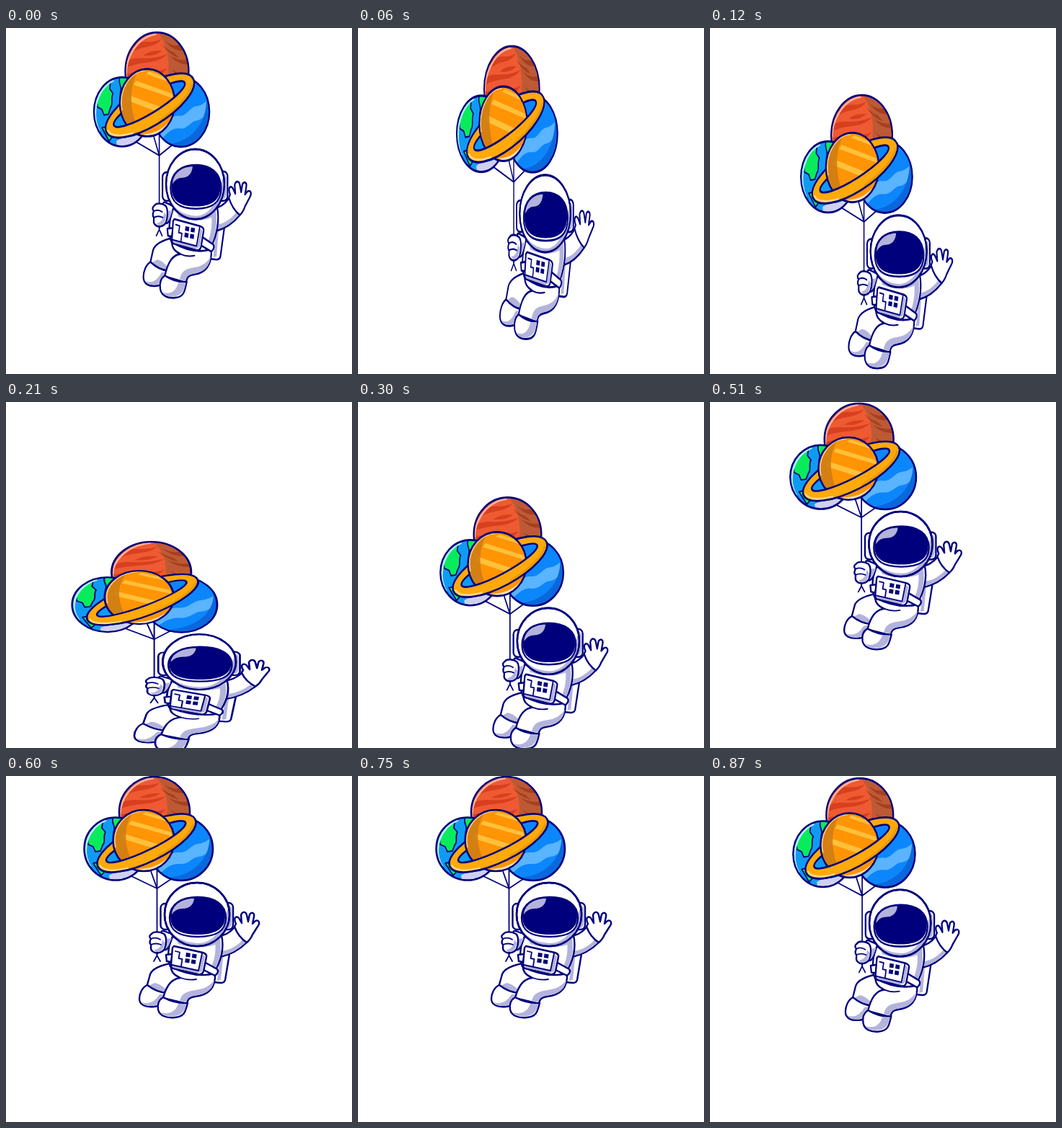
An HTML page for the animation above (0.9 s loop, 480 by 480 pixels).

```html
<!DOCTYPE html>
<html lang="en">
<head>
<meta charset="utf-8">
<title>Balloon astronaut</title>
<style>
  html, body { margin: 0; width: 100%; height: 100%; overflow: hidden; background: #fff; }
  svg { display: block; width: 100vw; height: 100vh; }
  .ink { fill: none; stroke: #00007c; stroke-width: 2.5; stroke-linecap: round; stroke-linejoin: round; }
  .suit { fill: #fff; stroke: #00007c; stroke-width: 2.4; stroke-linecap: round; stroke-linejoin: round; }
  .shade { fill: #b3b3dc; }
  .thin { stroke-width: 1.8; }
  .navy { fill: #00007c; }
</style>
</head>
<body>
<svg viewBox="0 0 480 480">
  <defs>
    <clipPath id="mars"><circle cx="206" cy="50" r="49"/></clipPath>
    <clipPath id="earth"><circle cx="152" cy="101" r="43.5"/></clipPath>
    <clipPath id="neptune"><circle cx="243" cy="101" r="44"/></clipPath>
    <clipPath id="saturn"><circle cx="191" cy="89.500" r="42.500"/></clipPath>
    <clipPath id="head"><ellipse cx="265" cy="192" rx="45" ry="44"/></clipPath>
    <clipPath id="front"><rect x="-90" y="-2" width="180" height="52"/></clipPath>
    <g id="ring">
      <path fill="#ffa90a" fill-rule="evenodd" d="M-75 0A75 26 0 0 1 75 0A75 26 0 0 1-75 0ZM-61-2A61 12 0 0 0 61-2A61 12 0 0 0-61-2Z"/>
      <path fill="none" stroke="#ffd98a" stroke-width="2.500" d="M-72-1C-72 10-52 17-38 20"/>
      <path fill="none" stroke="#e89a08" stroke-width="3" d="M5 23.500C40 22 62 14 71 4"/>
      <ellipse class="ink" rx="75" ry="26"/>
      <ellipse class="ink" cy="-2" rx="61" ry="12"/>
    </g>
  </defs>

  <g id="flyer">
    <g clip-path="url(#mars)">
      <rect x="150" width="112" height="105" fill="#ee5a31"/>
      <path fill="#d83f1f" d="M170 18C184 8 194 17 213 9C204 21 186 17 170 25ZM158 38C176 28 187 39 222 28C205 43 183 35 157 46ZM158 54C180 47 193 55 222 46L212 55C190 60 180 52 159 61ZM185 30Q196 23 214 24Q202 32 185 30Z"/>
      <path fill="#bd5a35" d="M207 0Q232 27 220 72L262 100V0Z"/>
      <path fill="#a6401f" d="M219 11Q229 19 241 17L247 24Q230 25 219 11ZM226 30Q240 38 256 35V41Q238 43 226 30ZM228 47Q243 56 254 52V58Q240 60 228 47ZM214 16Q224 24 232 26L240 33Q224 29 214 16Z"/>
      <path fill="none" stroke="#ffb59c" stroke-width="2.500" d="M160 67C152 36 174 7 205 3"/>
    </g>
    <circle class="ink" cx="206" cy="50" r="49"/>

    <g clip-path="url(#earth)">
      <rect x="106" y="55" width="92" height="92" fill="#109bf2"/>
      <g class="ink thin" style="fill:#08ec5c">
        <path d="M118 75C123 68 128 65 134 65L133 72L138 78C134 84 139 91 134 96L131 104L124 105L121 98L114 95Q112 84 118 75Z"/>
        <path d="M149 57C145 65 152 68 150 75C147 82 154 84 154 91L166 84V57Z"/>
        <path d="M121 121L131 119L139 130L132 138Z"/>
      </g>
      <path fill="#d0d0f0" d="M143 138C156 129 168 138 187 124L179 147H145Z"/>
      <path fill="none" stroke="#b5ecff" stroke-width="3" d="M117 126C104 105 111 73 139 61"/>
    </g>
    <circle class="ink" cx="152" cy="101" r="43.500"/>

    <g clip-path="url(#neptune)">
      <rect x="198" y="56" width="92" height="92" fill="#0c86fb"/>
      <path fill="#5ab4ff" d="M210 125C221 112 229 105 240 106C253 107 256 95 267 94C276 93 280 89 289 83V101C280 102 278 111 267 112C257 113 254 123 241 122C230 121 222 127 214 135Z"/>
      <path fill="#0a68dc" d="M282 78C286 112 262 137 228 141L240 148H290V78Z"/>
    </g>
    <circle class="ink" cx="243" cy="101" r="44"/>

    <path class="ink thin" d="M174 139L209.500 156L229 143M201 132L209.500 156"/>
    <path class="ink" style="stroke-width:1.800" d="M209.500 130V248"/>

    <use href="#ring" transform="translate(195 93) rotate(-26)"/>
    <g clip-path="url(#saturn)">
      <rect x="147" y="45" width="90" height="90" fill="#ff9405"/>
      <path fill="#ffc03a" d="M174 62L229 78L231 84L170 67ZM163 80L225 99L220 105L158 86ZM194 50L217 57L223 63L189 53Z"/>
      <path fill="#cf7d14" fill-opacity=".88" d="M181 45C160 66 162 105 184 134H145V45Z"/>
      <path fill="#ffe2b8" d="M183 129Q207 129 224 114L226 127L200 137Z"/>
      <path fill="none" stroke="#ffc77a" stroke-width="2" d="M152 99C146 74 164 50 188 49"/>
    </g>
    <circle class="ink" cx="191" cy="89.500" r="42.500"/>
    <g transform="translate(195 93) rotate(-26)"><use href="#ring" clip-path="url(#front)"/></g>

    <!-- backpack -->
    <path class="suit" d="M296 238L307 239Q312 241 310 247L304 283Q303 287 298 287L288 286Z"/>
    <path class="shade" d="M302 242L298 283L293 284L297 246Z"/>

    <!-- waving arm -->
    <path class="suit" d="M294 222C304 222 311 217 318 209L334 231C323 242 311 248 297 251Z"/>
    <path class="shade" d="M299 249C311 247 321 241 332 231L329 227C317 239 307 242 298 243Z"/>
    <path class="suit" d="M317 209L319 205C315 197 319 193 323 197L327 204L326 193C328 187 333 188 334 193L336 202L338 192C341 188 345 190 344 195L342 205L346 201C351 199 353 204 349 209L342 220Q339 227 334 231Q322 223 317 209Z"/>

    <!-- far leg -->
    <path class="suit" d="M233 259C216 262 203 267 200 275L195 293L220 305L245 282Z"/>
    <path class="shade" d="M198 291L206 287Q214 288 222 296L218 304Z"/>
    <path class="suit" d="M196 290C189 293 185 302 185 309C185 318 194 321 205 320C216 320 216 311 223 301Q209 300 196 290Z"/>
    <path class="shade" d="M188 314Q203 319 213 303L220 303Q214 320 200 319Q191 319 188 314Z"/>

    <!-- torso and near leg -->
    <path class="suit" d="M230 222C225 238 222 254 229 266C239 279 269 280 288 274C299 256 303 239 299 221Q267 244 230 222Z"/>
    <path class="shade" d="M297 225C300 242 296 260 287 273L279 275C289 260 292 244 290 231Z"/>
    <path class="shade" d="M237 229Q265 243 292 229L290 234Q266 242 239 233Z"/>
    <path class="suit" d="M229 265C229 272 233 276 242 280C230 281 222 292 218 308L251 316C252 309 255 307 262 306C281 304 291 294 290 274Q262 281 229 265Z"/>
    <path class="shade" d="M289 283C287 297 278 303 260 305Q251 307 250 314L241 312C244 301 250 299 263 297Q281 295 289 283Z"/>
    <path class="ink thin" d="M242 280Q253 284 264 282"/>
    <path class="suit" d="M218 307C211 311 210 318 211 324C213 333 223 336 234 335C249 334 249 325 252 315Q234 316 218 307Z"/>
    <path class="shade" d="M214 328Q233 333 239 316L250 316Q248 331 234 333Q220 335 214 328Z"/>

    <!-- belt and control box -->
    <path class="suit" d="M222 248L231 247L229 258L223 257ZM275 258L293 268Q296 272 290 277L272 268Z"/>
    <path class="suit" d="M233 236L273 245Q279 247 278 251L274 271Q272 276 267 275L232 267Q229 266 229 262L231 238Z"/>
    <path class="shade" d="M272 247L276 250L272 271L267 273Z"/>
    <path class="shade" d="M231 262L267 270V274L232 266Z"/>
    <path class="ink thin" d="M272 246L267 270L230 262M235 243L241 244.500L239.500 253L244.500 254L243 264"/>
    <path class="navy" d="M250 245l6 1-.8 5.500-6-1ZM258.700 246.500l6 1-.8 5.500-6-1ZM249 253l6 1-.8 5.500-6-1ZM257.500 254.500l6 1-.8 5.500-6-1Z"/>

    <!-- arm on the string -->
    <path class="suit" d="M232 220L219 215Q214 214 216 219L219 241Q223 243 227 234Z"/>
    <path class="shade" d="M230 225L221 226L221 239Q225 238 227 232Z"/>
    <path class="suit" d="M202 219C205 215 214 216 219 219C224 223 222 235 220 240C216 246 207 247 203 243C199 240 202 237 201 234C198 231 200 228 201 226C198 223 199 221 202 219Z"/>
    <path class="shade" d="M205 241Q215 241 217 227L220 231Q219 245 208 244Z"/>
    <path class="ink thin" d="M201 226Q208 223 214 227M201 234Q208 231 215 234"/>
    <path class="ink thin" d="M209.500 245V249L205 257M209.500 249L214 257"/>

    <!-- helmet -->
    <rect class="suit" x="214.500" y="177" width="14" height="36" rx="6"/>
    <rect class="suit" x="300" y="176" width="15" height="37" rx="6"/>
    <path class="shade" d="M309 179Q313 180 313 185V204Q313 210 308 211Z"/>
    <ellipse class="suit" cx="265" cy="192" rx="45" ry="44"/>
    <path class="shade" clip-path="url(#head)" d="M221 203Q233 231 267 232Q297 231 308 183L316 239H220Z"/>
    <path class="suit" d="M227 197C227 177 244 168 266 168S305 177 305 197S289 223 266 223S227 217 227 197Z"/>
    <path class="navy" d="M228 195C228 177 244 168 266 168S304 177 304 195S289 220 266 220S228 214 228 195Z"/>
    <path class="shade" d="M230 192C231 178 245 170 261 170C260 180 253 184 245 184Q235 184 230 192Z"/>
    <ellipse class="ink" cx="265" cy="192" rx="45" ry="44"/>
  </g>
</svg>
<script>
  const LOOP = 900, STEP = 30, PEAK = 675;
  // [time away from the peak, stretch, drop]
  const keys = [
    [0, -.008, -2], [75, 0, 0], [165, .021, 6], [195, .052, 14.5], [225, .102, 29.5],
    [285, .216, 75.8], [345, .134, 124.2], [435, -.127, 162.5], [450, -.13, 164]
  ];
  const flyer = document.getElementById('flyer');

  const slope = (i, c) => (keys[i + 1][c] - keys[i][c]) / (keys[i + 1][0] - keys[i][0]);

  function tangent(i, c) {
    if (i === 0 || i === keys.length - 1) return 0;
    const before = keys[i][0] - keys[i - 1][0], after = keys[i + 1][0] - keys[i][0];
    return (slope(i - 1, c) * after + slope(i, c) * before) / (before + after);
  }

  function sample(u, c) {
    let i = 0;
    while (i < keys.length - 2 && u > keys[i + 1][0]) i++;
    const h = keys[i + 1][0] - keys[i][0], s = (u - keys[i][0]) / h, r = 1 - s;
    return keys[i][c] * (1 + 2 * s) * r * r + keys[i + 1][c] * s * s * (3 - 2 * s)
      + h * s * r * (tangent(i, c) * r - tangent(i + 1, c) * s);
  }

  function draw(now) {
    const t = Math.floor((now % LOOP + .01) / STEP) * STEP;
    const gap = Math.abs(t - PEAK), u = Math.min(gap, LOOP - gap);
    const k = sample(u, 1), drop = sample(u, 2);
    flyer.setAttribute('transform',
      `translate(240 ${240 + drop}) scale(${1 - k} ${1 + k}) translate(-240 -240)`);
    requestAnimationFrame(draw);
  }
  draw(performance.now());
</script>
</body>
</html>
```
